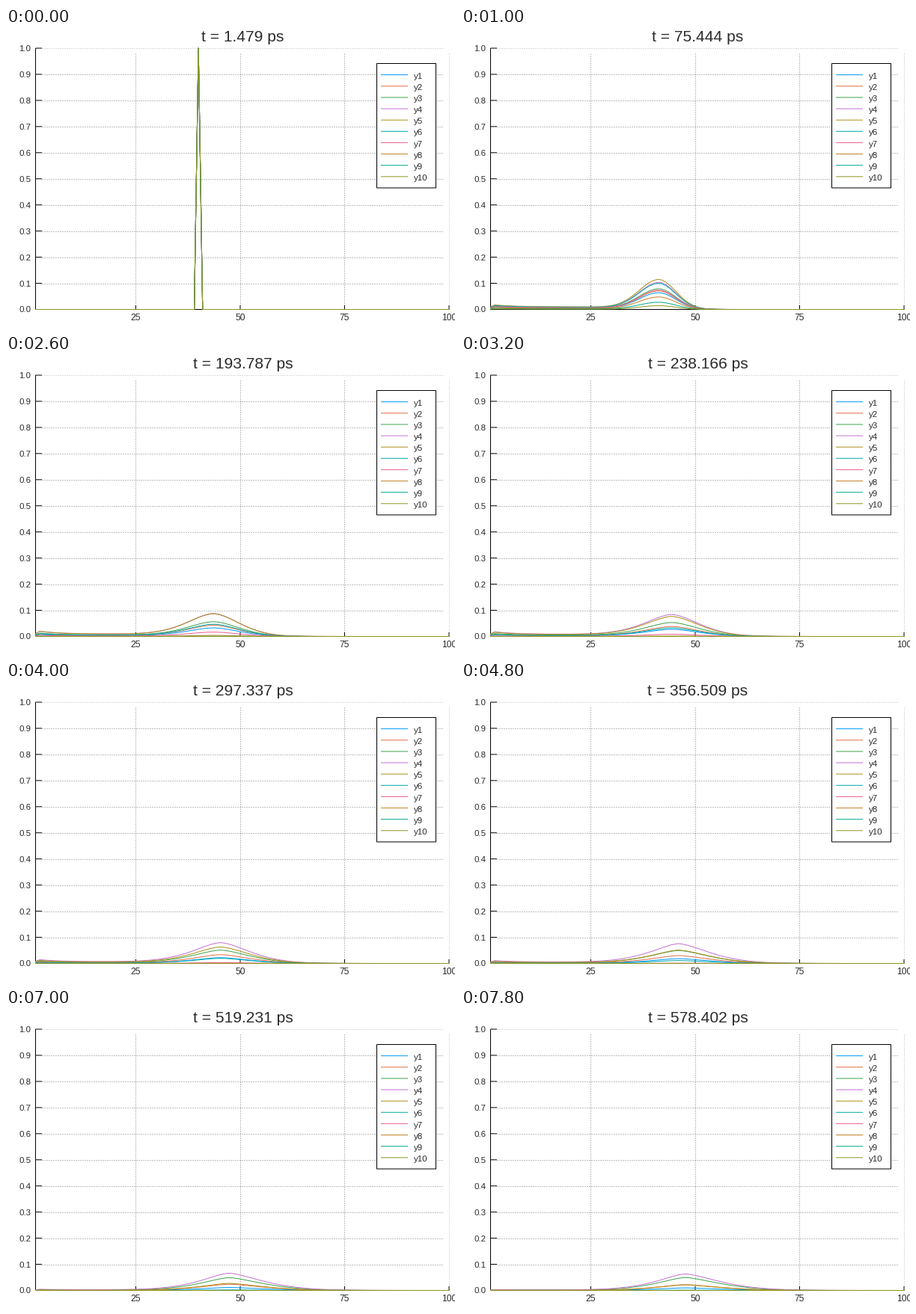
Write a matplotlib script that moves like this. It is 600 px wide and 400 px high and loops after 8000 ms.

```python
import numpy as np
import matplotlib.pyplot as plt
from matplotlib.animation import FuncAnimation
from matplotlib.patches import Rectangle

W, H, DPI = 600, 400, 100
FRAMES, INTERVAL = 40, 200
PX = 72 / DPI                      # one pixel in points
STEP = 250 / 169                   # picoseconds per simulation step
LEFT, RIGHT, TOP, BOTTOM = 39.5, 592, 27, 376.5
ROW = 15.13                        # legend line spacing

COLORS = ["#009AFA", "#E36F47", "#3EA44E", "#C371D2", "#AC8E18",
          "#00AAAE", "#ED5E93", "#C68225", "#00A98D", "#8E971E"]

sites = np.arange(1, 101)
levels = np.arange(1, 11)

# Levels above the third first gain, then lose faster the higher they are
GAIN = .9 * np.maximum(levels - 3, 0)
LOSS = np.where(levels > 3,
                .0034 * np.maximum(levels - 4, 0) ** 1.55,
                .0014 * (3 - levels) - .0011)


def px(x):
    return LEFT + (x - 1) * (RIGHT - LEFT) / 99


def py(y):
    return BOTTOM - y * (BOTTOM - TOP)


def rise(t, tau, power=1.0):
    return 1 - np.exp(-(t / tau) ** power)


def pulse(t, tau):
    """Rises to 1 at tau, then fades."""
    return t / tau * np.exp(1 - t / tau)


def heights(t):
    return .63 / np.sqrt(t) * np.exp(GAIN * rise(t, 150) - LOSS * t)


def profile(t):
    """Spreading packet that drifts right, with a small pile-up at the left edge."""
    d = sites - (40 + 8.4 * rise(t, 300, 1.3))
    width = np.where(d < 0, 9.7 * rise(t, 60, .8), 12.5 * rise(t, 150, .7))
    power = 1.5 + .5 * np.exp(-(t / 250) ** 2)
    packet = np.exp(-(np.abs(d) / width) ** power)
    floor = .11 * pulse(t, 160) / (1 + np.exp((d + 8) / 3))
    edge = .12 * pulse(t, 190) ** 2 * np.exp(-(sites - 2) / 5)
    rest = floor + edge
    rest[0] *= .5
    return packet + rest


def populations(n, t):
    if n == 0:
        return np.tile(sites == 40, (len(levels), 1)).astype(float)
    return np.outer(heights(t), profile(t))


fig = plt.figure(figsize=(W / DPI, H / DPI), dpi=DPI, facecolor="white")
ax = fig.add_axes([0, 0, 1, 1])
ax.set_xlim(0, W)
ax.set_ylim(H, 0)
ax.axis("off")


def stroke(x0, y0, x1, y1, color="black", z=2, snap=False, **kw):
    ax.plot([x0, x1], [y0, y1], color=color, lw=PX, zorder=z, snap=snap,
            solid_capstyle="butt", dash_capstyle="butt", **kw)


def label(x, y, text, size, ha="center"):
    return ax.text(x, y, text, fontsize=size * PX, ha=ha, va="baseline",
                   family="Liberation Sans", color="#2a2a2a", zorder=6)


def grid(x0, y0, x1, y1, faint):
    stroke(x0, y0, x1, y1, z=1, snap=True, ls=(0, (1, 2)),
           alpha=.28 if faint else .5)


for k in range(11):
    y = py(k / 10)
    if k:
        grid(48, y, 584, y, k == 10)
    stroke(LEFT, y, 48, y)
    label(33.5, y + 4, f"{k / 10:.1f}", 11.5, "right")

for v in (25, 50, 75, 100):
    x = px(v)
    grid(x, 371, x, 34, v == 100)
    stroke(x, BOTTOM, x, 371)
    label(x, 391, str(v), 12)

stroke(LEFT, TOP, LEFT, BOTTOM + .5)
stroke(LEFT, BOTTOM, RIGHT, BOTTOM)

curves = [ax.plot([], [], color=c, lw=PX, zorder=3 + i / 20, snap=False)[0]
          for i, c in enumerate(COLORS)]

box_top = 47.5
ax.add_patch(Rectangle((495.5, box_top), 79, 11 * ROW, fc="white", ec="black",
                       lw=PX, zorder=5, snap=False))
for i, c in zip(levels, COLORS):
    y = box_top + i * ROW
    stroke(501, y, 537, y, c, z=6)
    label(544.5, y + 5.2, f"y{i}", 11.5, "left")

title = label(316.5, 18.5, "", 21)


def draw(n):
    t = STEP * (1 + 10 * n)
    for curve, values in zip(curves, populations(n, t)):
        curve.set_data(px(sites), py(values))
    title.set_text(f"t = {round(t, 3)} ps")
    return [*curves, title]


anim = FuncAnimation(fig, draw, frames=FRAMES, interval=INTERVAL,
                     repeat=True, repeat_delay=0)
plt.show()
```
